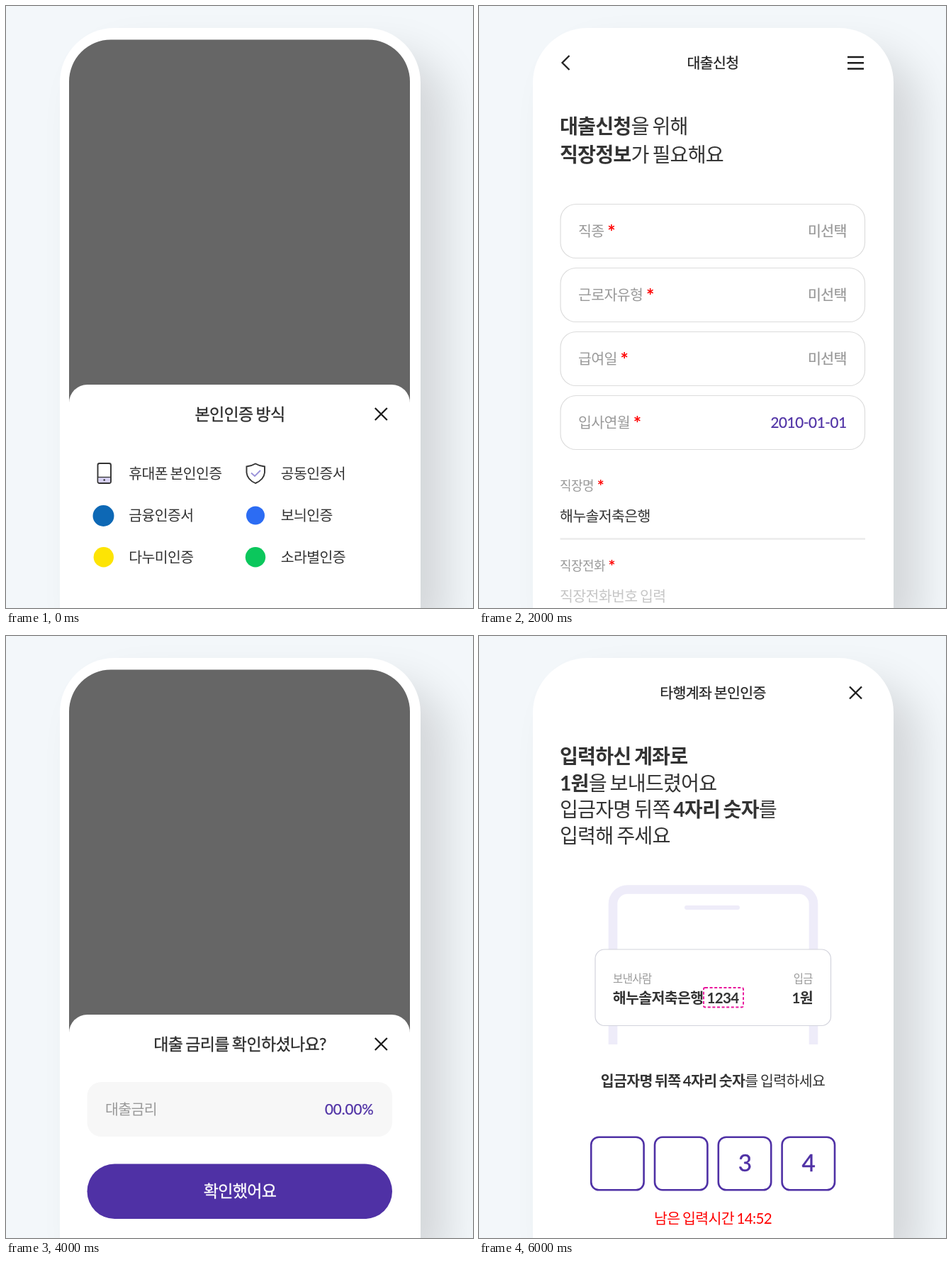
Write an HTML page that moves like this. It is 659 px wide and 849 px high and loops after 7000 ms.

```html
<!DOCTYPE html>
<html lang="ko">
<head>
<meta charset="utf-8">
<style>
  html, body { margin: 0; width: 100%; height: 100%; overflow: hidden; background: #f3f7fa; }
  .frame { position: relative; width: 100%; height: 100%; overflow: hidden; contain: strict; }
  .phone {
    position: absolute; left: 75.5px; top: 31px; bottom: 0; width: 509.5px;
    border-radius: 77px 77px 0 0; background: #fff;
    box-shadow: 36px 36px 60px rgba(0, 0, 0, .135);
  }
  svg { position: absolute; left: 0; top: 0; width: 100%; height: 100%; }
  text { font-family: Lato, "Noto Sans CJK KR", "Noto Sans CJK", sans-serif; word-spacing: -.055em; }
  .medium { stroke-width: .012em; }
  .bold { font-weight: 700; }
  .star { font-size: 1.3em; font-weight: 700; fill: #f00; stroke: none; }
</style>
</head>
<body>
<div class="frame">
  <div class="phone"></div>
  <svg id="stage"></svg>
</div>
<script>
const UNIT = 1.283, STEP = 1000;
const INK = '#333', GRAY = '#999', PALE = '#c6c6c6', PURPLE = '#4f31a5';
const bold = s => `<tspan class="bold">${s}</tspan>`;
const star = '<tspan class="star" dx="4.7" dy="2.5">*</tspan>';

// y is the middle of the Hangul glyphs
function text(x, y, content, { size = 16, color = INK, weight = '', anchor = 'start', spacing = -.03 } = {}) {
  const px = size * UNIT;
  const outline = weight === 'medium' ? `stroke="${color}"` : '';
  return `<text x="${x}" y="${y + px * .375}" font-size="${px}" fill="${color}" ${outline} class="${weight}"
    text-anchor="${anchor}" letter-spacing="${px * spacing}">${content}</text>`;
}
const rect = (x, y, w, h, r, fill, stroke = 'none', width = 1.2, extra = '') =>
  `<rect x="${x}" y="${y}" width="${w}" height="${h}" rx="${r}" fill="${fill}" stroke="${stroke}" stroke-width="${width}" ${extra}/>`;
const path = (d, stroke, width, extra = '') =>
  `<path d="${d}" fill="none" stroke="${stroke}" stroke-width="${width}" ${extra}/>`;
const circle = (x, y, r, fill, stroke = 'none', width = 1.5) =>
  `<circle cx="${x}" cy="${y}" r="${r}" fill="${fill}" stroke="${stroke}" stroke-width="${width}"/>`;

const centered = (y, s, opts) => text(330, y, s, { anchor: 'middle', ...opts });
const heading = (y, s) => text(114, y, s, { size: 22 });
const label = (y, s) => text(114, y, s, { size: 14, color: GRAY });
const placeholder = (y, s) => text(114, y, s, { color: PALE });
const rule = y => path(`M114.5 ${y}H545`, '#ebebeb', 2.4);
const close = (x, y) => path(`M${x - 8.5} ${y - 8.5}l17 17m0-17l-17 17`, '#1c1c1c', 2.3);
const value = (y, s, color = GRAY, spacing) =>
  text(518.8, y, s, { color, weight: 'medium', anchor: 'end', spacing });
const select = (y, name, chosen = value(y + 38, '미선택')) =>
  rect(115, y, 429.5, 76, 22, '#fff', '#dcdcdc') + text(140, y + 38, name, { color: GRAY }) + chosen;
const info = (y, name, result, spacing) =>
  rect(114.5, y, 430.5, 77, 20, '#f7f7f7') + text(140, y + 38.5, name, { color: GRAY }) +
  value(y + 38.5, result, PURPLE, spacing);
const pill = (x, y, s) => rect(x, y, 544.5 - x, 37.5, 18.75, '#fff', '#ccc') +
  text((x + 544.5) / 2, y + 18.5, s, { size: 14, anchor: 'middle' });
const accountInput = y => placeholder(y, '계좌번호') + pill(443.5, y - 18.5, '계좌인증') + rule(y + 32);

const navBar = path('M127.5 70L117.5 80L127.5 90', '#222', 2.3) +
  centered(80, '대출신청', { weight: 'medium', color: '#222' }) +
  path('M520 72h23m-23 8.25h23m-23 8.25h23', '#1c1c1c', 2.4);

const sheet = title => '<path d="M89 559V106.5a59 59 0 0 1 59-59H511a59 59 0 0 1 59 59V559z" fill="#666"/>' +
  rect(89, 534, 481, 330, 25.6, '#fff') +
  centered(575, title, { size: 18, weight: 'medium', color: '#2b2b2b' }) + close(529.3, 575.5);

const methods = [
  ['휴대폰 본인인증', rect(129.5, 645, 18.5, 28, 2.5, '#fff', INK, 1.9) + rect(130.5, 665, 16.5, 7, 1, '#d8d2f4') +
    path('M130 664.5h18', INK, 1.3) + circle(138.7, 668.5, 1.3, INK)],
  ['공동인증서', path('M352 645.5Q358 649 365 649.5V658Q364 668 352 673Q340.5 668 339.5 658V649.5Q346 649 352 645.5z', INK, 1.9) +
    path('M346 658.5l5 4.5l8-8', '#9b93d9', 1.9)],
  ['금융인증서', circle(137.5, 719, 15, '#0d68b5')],
  ['보늬인증', circle(352, 718.5, 13, '#2c6cf3')],
  ['다누미인증', circle(137.8, 777.3, 14.2, '#fde404')],
  ['소라별인증', circle(352, 777.3, 14.2, '#0bc75c')],
];

const codeBoxes = ['', '', '3', '4'].map((digit, i) => {
  const x = 158.2 + i * 89.8;
  return rect(x, 706.7, 74.4, 74.6, 11, '#fff', PURPLE, 2.6) +
    text(x + 37.5, 742.7, digit, { size: 26, color: PURPLE, weight: 'medium', anchor: 'middle', spacing: 0 });
}).join('');

const scenes = [
  sheet('본인인증 방식') + methods.map(([name, icon], i) =>
    icon + text(i % 2 ? 387.7 : 173.2, 659 + (i >> 1) * 59, name)).join(''),

  navBar + heading(169.5, bold('자택주소') + '를 입력해주세요') +
  label(250.5, '자택주소') + placeholder(294, '우편번호') + pill(411.5, 276, '우편번호찾기') + rule(326.3) +
  placeholder(384, '주소') + rule(416.3) + placeholder(474, '상세주소 입력') + rule(506.3),

  navBar + heading(169.5, bold('대출신청') + '을 위해') + heading(209, bold('직장정보') + '가 필요해요') +
  select(279.5, '직종' + star) + select(369.5, '근로자유형' + star) + select(459.5, '급여일' + star) +
  select(549.5, '입사연월' + star, value(587.5, '2010-01-01', PURPLE, -.015)) +
  label(676, '직장명' + star) + text(114, 719.5, '해누솔저축은행') + rule(751.5) +
  label(789, '직장전화' + star) + placeholder(832, '직장전화번호 입력'),

  navBar + heading(169.5, bold('얼마를 대출하시겠어요?')) +
  text(115, 252, '대출신청금액' + star, { weight: 'medium' }) +
  text(115, 311.5, '금액 입력', { size: 32, color: '#a0a0a0' }) + path('M114.5 348.5H545', '#7f6ec2', 1.8) +
  text(114, 373, '나의 대출한도 :', { size: 14, color: '#666' }) +
  text(225.5, 373, '5,500만원', { size: 14, color: PURPLE }) + path('M226 382.3H300.5', PURPLE, 1.3) +
  select(436.5, '대출기간') + select(526.5, '납입일') +
  info(641.5, '상환방법', '만기일시상환') + info(731.3, '중도수수료율', '00.00%', 0) +
  rect(114.5, 821, 430.5, 77, 20, '#f7f7f7'),

  sheet('대출 금리를 확인하셨나요?') + info(629, '대출금리', '00.00%', 0) +
  rect(114.5, 744.5, 430.5, 77.5, 38.75, PURPLE) +
  centered(782.5, '확인했어요', { size: 18, weight: 'medium', color: '#fff' }),

  navBar + heading(169.5, bold('타행 본인 계좌 인증을')) + heading(209, '같이 진행할게요') +
  text(114, 292, '대출금 입금 계좌정보를 입력해 주세요', { weight: 'bold' }) +
  select(326, '은행선택' + star) + accountInput(460) +
  circle(127.3, 518, 9.6, '#fff', INK) + path('M127.3 512.5v7m0 2v2', INK, 1.7) +
  text(145.8, 517.5, '타행 본인 계좌 인증도 동시에 진행돼요', { size: 14, color: GRAY }) +
  text(114, 595, '이자 등이 출금될 계좌정보를 입력해 주세요', { weight: 'bold' }) +
  select(629, '은행선택' + star) +
  circle(127.2, 744, 9.2, '#fff', PURPLE, 7.6) + text(150, 744, '계좌를 같이 사용할게요') + accountInput(816),

  centered(80, '타행계좌 본인인증', { weight: 'medium', color: '#222' }) + close(531.5, 80) +
  heading(169.5, bold('입력하신 계좌로')) + heading(207, bold('1원') + '을 보내드렸어요') +
  heading(244.3, '입금자명 뒤쪽 ' + bold('4자리 숫자') + '를') + heading(281.5, '입력해 주세요') +
  path('M189 576V378a20.5 20.5 0 0 1 20.5-20.5H451.5a20.5 20.5 0 0 1 20.5 20.5V576', '#eeecf9', 12.6) +
  path('M293 383H365', '#eeecf9', 6, 'stroke-linecap="round"') +
  rect(164, 442, 332.5, 107.5, 13, '#fff', '#d2d3dc') +
  text(189, 483, '보낸사람', { size: 12, color: GRAY }) +
  text(471, 483, '입금', { size: 12, color: GRAY, anchor: 'end' }) +
  text(188.7, 510.5, '해누솔저축은행', { weight: 'bold' }) +
  rect(317, 496, 56, 27.5, 2, 'none', '#e8159b', 1.9, 'stroke-dasharray="4 2.6"') +
  text(321.5, 510.5, '1234', { weight: 'bold' }) +
  text(471, 510.5, '1원', { weight: 'bold', anchor: 'end' }) +
  centered(627.5, bold('입금자명 뒤쪽 4자리 숫자') + '를 입력하세요') + codeBoxes +
  centered(821.5, '남은 입력시간 14:52', { color: '#f00' }),
];

const stage = document.getElementById('stage');
stage.innerHTML = scenes.map(s => `<g display="none">${s}</g>`).join('');

function draw(now) {
  const current = Math.floor(now / STEP) % scenes.length;
  [...stage.children].forEach((g, i) => g.setAttribute('display', i === current ? 'inline' : 'none'));
}
const start = performance.now();
function tick() {
  draw(performance.now() - start);
  requestAnimationFrame(tick);
}
tick();
</script>
</body>
</html>
```
